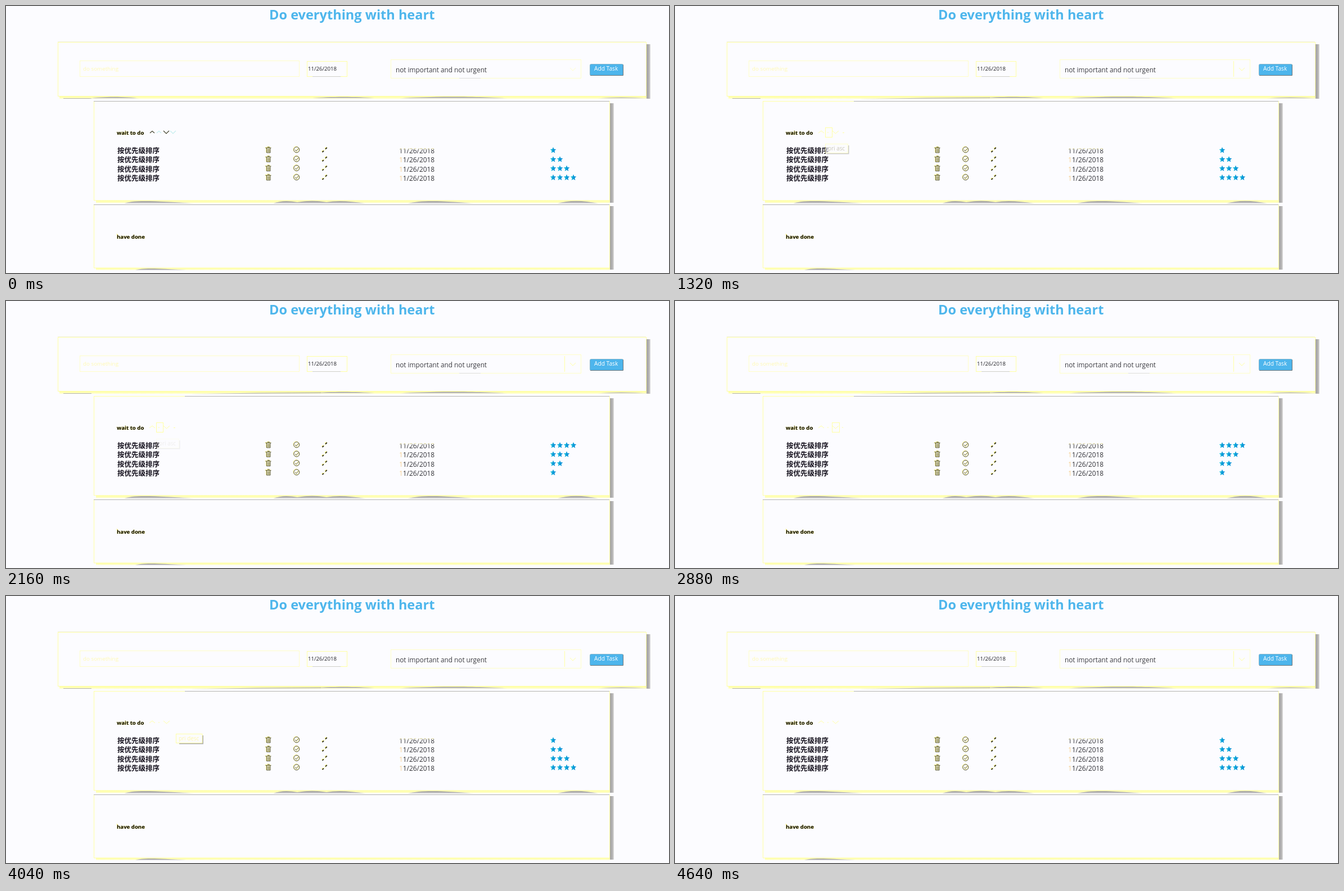
An HTML page for the animation above (5360 ms loop, 1179x475 px).

```html
<!DOCTYPE html>
<html lang="en">
<head>
<meta charset="utf-8">
<title>Task list</title>
<style>
html, body { margin: 0; width: 100%; height: 100%; overflow: hidden; background: #fcfcff; }
svg { display: block; width: 1179px; height: 475px; font-family: "Open Sans", "Noto Sans", sans-serif; }
.panel { fill: #fcfcff; stroke: #ffffa4; }
.line { fill: none; stroke: #ffffa4; }
.pale { fill: none; stroke: #fffec8; }
.grey { fill: #acabab; }
.lens { fill: url(#fall); }
.glow { fill: url(#warm); }
.side { fill: url(#across); }
.edge { fill: none; stroke: #b4b4b0; }
.ink { fill: none; stroke: #2c2c20; }
.bold { font-weight: 700; font-size: 9.65px; paint-order: stroke; stroke: #fff680; stroke-width: .7px; }
.date { font-size: 11.9px; fill: #35353a; }
.tip { font-size: 9.9px; }
.task { font: 700 12.5px "Noto Sans CJK SC", "Noto Sans CJK", sans-serif; fill: #14101c; }

/* One loop for every part; switches are stepped, fades are linear. */
.early, .late, .asc, .desc, .hover, .tip { animation: 5360ms linear infinite; }
.early { animation-name: early; }
.late { animation-name: late; }
.asc, .desc, .hover { animation-timing-function: step-end; }
.asc { animation-name: asc; }
.desc { animation-name: desc; }
.h2 { animation-name: hover2; }
.h3 { animation-name: hover3; }
.h4 { animation-name: hover4; }
.t2 { animation-name: tip2; }
.t4 { animation-name: tip4; }
@keyframes early { 0%, .74% { opacity: 1 } 2.98%, 100% { opacity: 0 } }
@keyframes late { 0%, .74% { opacity: 0 } 2.98%, 100% { opacity: 1 } }
@keyframes asc { 0% { opacity: 1 } 37.3% { opacity: 0 } 75.3%, 100% { opacity: 1 } }
@keyframes desc { 0% { opacity: 0 } 37.3% { opacity: 1 } 75.3%, 100% { opacity: 0 } }
@keyframes hover2 { 0% { opacity: 0 } 15.6% { opacity: 1 } 53.7%, 100% { opacity: 0 } }
@keyframes hover3 { 0% { opacity: 0 } 53.7% { opacity: 1 } 60.4%, 100% { opacity: 0 } }
@keyframes hover4 { 0% { opacity: 0 } 60.4% { opacity: 1 } 75.3%, 100% { opacity: 0 } }
@keyframes tip2 { 0%, 22.4% { opacity: 0 } 26.1%, 36.6% { opacity: 1 } 41%, 100% { opacity: 0 } }
@keyframes tip4 { 0%, 63.4% { opacity: 0 } 65.7%, 75.4% { opacity: 1 } 79.8%, 100% { opacity: 0 } }
</style>
</head>
<body>
<svg viewBox="0 0 1179 475">
<defs>
  <linearGradient id="fall" x2="0" y2="1">
    <stop stop-color="#a2a1a1"/><stop offset=".5" stop-color="#b2b1b1"/><stop offset="1" stop-color="#e2e1e0"/>
  </linearGradient>
  <linearGradient id="warm" x2="0" y2="1">
    <stop stop-color="#ffffa4"/><stop offset=".5" stop-color="#ffffb8"/><stop offset="1" stop-color="#fefee8"/>
  </linearGradient>
  <linearGradient id="across">
    <stop stop-color="#a6a5a5"/><stop offset=".6" stop-color="#b2b1b1"/><stop offset="1" stop-color="#dedddd"/>
  </linearGradient>
  <linearGradient id="cut" gradientUnits="userSpaceOnUse" x1="0" y1="253" x2="0" y2="256">
    <stop stop-color="#fff6a8"/><stop offset="1" stop-color="#35353a"/>
  </linearGradient>
  <linearGradient id="blue"><stop stop-color="#1cd0dc"/><stop offset=".6" stop-color="#0a93d8"/></linearGradient>
  <path id="star" fill="url(#blue)" d="M973 251l1.5 3.5 3.8.4-2.9 2.6.9 3.9-3.3-2-3.3 2 .9-3.9-2.9-2.6 3.8-.4z"/>
  <g id="s2"><use href="#star"/><use href="#star" x="12"/></g>
  <g id="s3"><use href="#s2"/><use href="#star" x="24"/></g>
  <g id="s4"><use href="#s3"/><use href="#star" x="36"/></g>
  <g id="icons">
    <path d="M461.5 252.5h10M463.5 253v8h6.500v-8M465.800 254v6M468 254v6M465 251h4"/>
    <circle cx="516.800" cy="255.800" r="5"/>
    <path d="M514 256l2.200 2 4-4.400"/>
    <path d="M562.500 260l2.500-2.200M568 254.500l2.800-2.500" stroke-width="1.800"/>
  </g>
  <g id="task">
    <text class="task" x="198" y="262">按优先级排序</text>
    <use href="#icons" fill="none" stroke="#fff67c" x="-.8" y="-.8"/>
    <path class="line" d="M564.500 258.500l5-4.500"/>
    <use href="#icons" class="ink" stroke-width=".8"/>
  </g>
</defs>
<rect width="1179" height="475" fill="#fcfcff"/>
<text x="468" y="24" font-size="23.55" font-weight="700" fill="#4eb6ec">Do everything with heart</text>

<!-- Entry panel -->
<rect class="glow" x="95" y="161" width="1044" height="4.500"/>
<rect class="side" x="1139" y="68" width="7" height="97"/>
<path class="lens" d="M545 164C575 161 625 161 655 164ZM700 164.500C735 160.500 850 160.500 892 164.500ZM1052 164.500Q1090 160.500 1144 164.500Z"/>
<path class="edge" d="M102 164.500h50"/>
<path class="lens early" d="M148 164.500C170 160.800 215 160.800 237 164.500Z"/>
<path class="lens late" d="M325 165.800Q450 163 560 162.800L560 164Q450 164.500 325 165.800Z"/>
<rect class="panel" x="92.500" y="64.500" width="1046" height="96"/>
<path d="M92 63.500h1046" stroke="#f0f0ea"/>
<rect class="pale" x="131.500" y="97.500" width="390" height="28"/>
<text x="137" y="115" font-size="9.8" fill="#fff9b0">do something</text>
<rect class="line" x="535.500" y="98.500" width="71" height="27"/>
<path d="M545 125.500h50" stroke="#cfcfc8"/>
<text x="537" y="115" font-size="9.6" fill="#222226">11/26/2018</text>
<rect class="pale" x="684.500" y="95.500" width="338" height="33"/>
<path d="M806 128.500h38" stroke="#deded8"/>
<text x="693" y="118" font-size="11.8" fill="#3d3d42">not important and not urgent</text>
<path class="pale" d="M1003 110l5 5 5-5"/>
<path class="line late" d="M993.500 98v28M1003 110l5 5 5-5"/>
<rect x="1038.500" y="103.500" width="59" height="20" rx="2" fill="#4db5ec" stroke="#7fb4cc"/>
<path d="M1039 123.500h58.500v-19" fill="none" stroke="#6c7478"/>
<text x="1046" y="115" font-size="10.2" fill="#fff">Add Task</text>

<!-- Open tasks -->
<rect class="glow" x="160" y="346" width="914" height="5"/>
<rect class="side" x="1074" y="173" width="7" height="177"/>
<path class="lens" d="M210 351.500C224 345 262 346 335 351.500ZM475 351.500Q492 344 518 349Q545 344 570 349Q596 344 640 351.500ZM714 351.500C738 345 775 346 832 351.500ZM980 351.500C1000 345 1026 345 1054 351.500Z"/>
<rect class="panel" x="156.500" y="169.500" width="917" height="176.500"/>
<path class="edge" d="M318 169.500h755"/>
<path class="edge early" d="M156 169.500h164"/>
<text class="bold" x="197" y="229">wait to do</text>
<g class="early" fill="none" stroke-width="1.200">
  <path d="M256 226l4-3.500 4 3.500M280 222l5 5 5-5" stroke="#45452f"/>
  <path d="M268 226l4-3.500 4 3.500M292 222l5 5 5-5" stroke="#c4eeee"/>
</g>
<g class="late line">
  <path d="M255 226l5-4 5 4M280 222l5.500 5 5.500-5M271 225h2"/>
</g>
<g class="hover h2 line"><rect x="267.500" y="216.500" width="12" height="17"/><path d="M298 225.500h3"/></g>
<g class="hover h3 line"><rect x="279.500" y="216.500" width="13" height="17"/><path d="M297 224l2 2"/></g>
<g class="hover h4 line"><rect x="292.500" y="216.500" width="12" height="17"/><path d="M296 225l2 2 2-2"/></g>

<use href="#task"/><use href="#task" y="16.300"/><use href="#task" y="32.600"/><use href="#task" y="48.900"/>
<text class="date" x="699" y="262" style="fill:url(#cut)">11/26/2018</text>
<g class="date">
  <text x="699" y="278"><tspan fill="#f6cf92">1</tspan>1/26/2018</text>
  <text x="699" y="294.500"><tspan fill="#f6cf92">1</tspan>1/26/2018</text>
  <text x="699" y="311"><tspan fill="#f6cf92">1</tspan>1/26/2018</text>
</g>
<g class="asc"><use href="#star"/><use href="#s2" y="16.200"/><use href="#s3" y="32.400"/><use href="#s4" y="48.600"/></g>
<g class="desc"><use href="#s4"/><use href="#s3" y="16.200"/><use href="#s2" y="32.400"/><use href="#star" y="48.600"/></g>

<g class="tip t2">
  <path class="grey" d="M270 248h39.500v15.500H270z"/>
  <rect class="panel" x="267.500" y="245.500" width="40" height="16"/>
  <text x="272" y="257" fill="#aaa58a">pri asc</text>
</g>
<g class="tip t4">
  <path class="grey" d="M308 248h43v15.500h-43z"/>
  <rect class="panel" x="302.500" y="245.500" width="46.500" height="16"/>
  <text x="307" y="257" fill="#fff7a8">pri desc</text>
</g>

<!-- Finished tasks -->
<rect class="glow" x="160" y="466" width="914" height="4"/>
<rect class="side" x="1074" y="356" width="7" height="113"/>
<path class="lens" d="M230 470C240 466 265 466 320 470Z"/>
<rect class="panel" x="156.500" y="353.500" width="917" height="112.500"/>
<path class="edge" d="M156 353.500h917"/>
<text class="bold" x="197" y="413.500">have done</text>
<path d="M197.500 405v4" stroke="#fff27a"/>
</svg>
</body>
</html>
```
